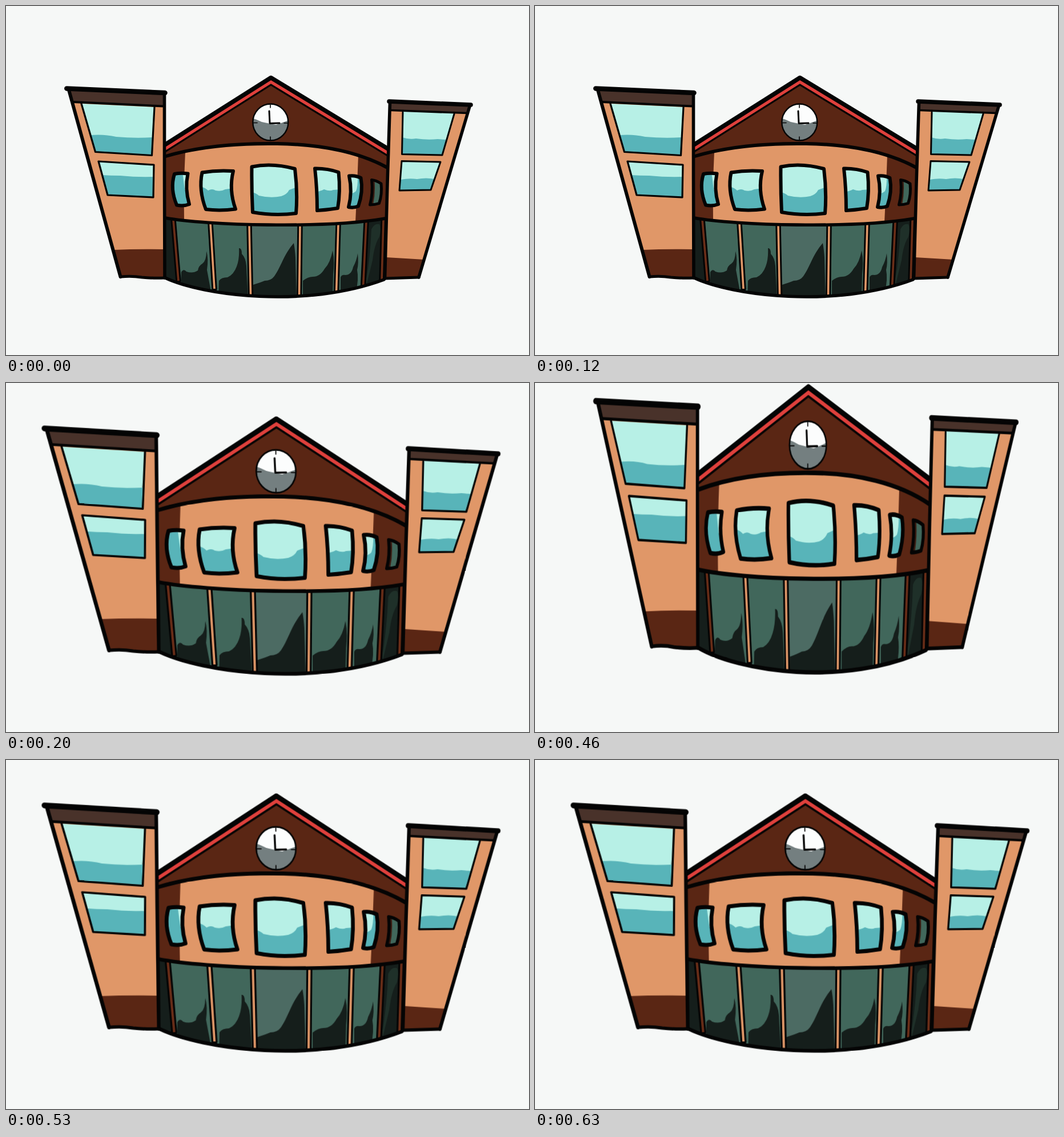
Write an HTML page that moves like this. It is 916 px wide and 611 px high and loops after 0.7 s.

```html
<!DOCTYPE html>
<html lang="en">
<head>
<meta charset="utf-8">
<title>Bouncing building</title>
<style>
  html, body { margin: 0; width: 100%; height: 100%; overflow: hidden; background: #f6f8f7; }
  .stage { position: relative; width: 100%; height: 100%; overflow: hidden; contain: strict; }
  svg {
    position: absolute; left: 0; top: 0; width: 916px; height: 611px;
    transform-origin: 0 0;
    animation: bounce 700ms step-end infinite;
  }
  /* rest, swell with a slight perspective tilt, tall stretch, swell */
  @keyframes bounce {
    0%, 100% { transform: none; }
    28.5714%, 75.7143% {
      transform: translate(67px, 79px)
        matrix3d(1.14872, .01622, 0, .00003217, .02013, 1.19243, 0, .00003777, 0, 0, 1, 0, 0, 0, 0, 1)
        translate(-106px, -144px);
    }
    51.4286% { transform: matrix(1.0409, 0, 0, 1.303, -4.3, -156.6); }
  }
  .ink { fill: none; stroke: #040404; stroke-linecap: round; stroke-linejoin: round; }
  .tan { fill: #e09768; }
  .brown { fill: #5a2614; }
  .cap { fill: #49322a; }
  .sky { fill: #b7f0e6; }
  .sea { fill: #58b4b9; }
  .green { fill: #41675b; }
  .dark { fill: #151e1b; }
  .bar { fill: none; stroke: #e09768; stroke-width: 3.6; }
  .bar.shade { stroke: #6b2e18; }
</style>
</head>
<body>
<div class="stage">
<svg viewBox="0 0 916 611">
  <defs>
    <path id="w1" d="M295 294Q306 292 318.500 293.500Q313 320 321 347Q311 351 299 348.500Q287 320 295 294Z"/>
    <path id="w2" d="M343.500 291.500Q370 287 398 289Q390 322 402 355.500Q375 359 350 356Q337 322 343.500 291.500Z"/>
    <path id="w3" d="M430.500 281.500Q466 274 506 285Q511 325 508 363Q470 368 432 361Q430 320 430.500 281.500Z"/>
    <path id="w4" d="M541 284.500Q562 284 582.500 291Q586 325 581 354Q563 357 545 358Q545 320 541 284.500Z"/>
    <path id="w5" d="M601 297.500Q612 296 621.500 301Q626 325 617 350.500Q609 354 600 352Q607 325 601 297.500Z"/>
    <path id="w6" d="M640.500 304.500Q648 305 657 311Q659 330 653.500 345.500Q646 348 637.500 348Q643 328 640.500 304.500Z"/>
    <path id="bars" d="M358 381L365 495M426 384L428.500 505M515 385L513.500 508M582 382L578.500 503"/>
    <path id="ends" d="M293 374L302 481M631 378L625.500 492M661 375L658 482"/>
    <clipPath id="c1"><use href="#w1"/></clipPath>
    <clipPath id="c2"><use href="#w2"/></clipPath>
    <clipPath id="c3"><use href="#w3"/></clipPath>
    <clipPath id="c4"><use href="#w4"/></clipPath>
    <clipPath id="c5"><use href="#w5"/></clipPath>
    <clipPath id="c6"><use href="#w6"/></clipPath>
    <clipPath id="face"><ellipse cx="463.300" cy="203.500" rx="31" ry="32"/></clipPath>
    <clipPath id="front"><path d="M279 371C350 384 560 390 664 372L662 479C525 530 345 507 279 476Z"/></clipPath>
  </defs>

  <!-- gable -->
  <path class="brown" d="M280 246L464 126L669 252V290H280Z"/>
  <path d="M279 249.500L464 132.500L669 257" fill="none" stroke="#df403c" stroke-width="6"/>
  <path class="ink" d="M279 242.500L464 125.500L669 250" stroke-width="7.500"/>
  <path class="ink" d="M279 255L464 138L669 262.500" stroke-width="3"/>

  <!-- upper wall -->
  <path class="tan" d="M280 263C340 245 410 240 475 241C545 242 615 254 668 283L664 372C560 390 350 384 279 371Z"/>
  <path class="brown" d="M280 263L314 255Q311 315 312 375L279 371Z"/>
  <path class="brown" d="M617 261Q643 269 668 283L664 372L612 379Q615 320 617 261Z"/>
  <path class="ink" d="M280 263C340 245 410 240 475 241C545 242 615 254 668 283" stroke-width="6"/>

  <!-- shop front -->
  <g clip-path="url(#front)">
    <path class="green" d="M278 360H668V520H278Z"/>
    <path d="M426 370H515V520H428Z" fill="#4c6b63"/>
    <g class="dark">
      <path d="M275 360H292L302 500H275Z"/>
      <path d="M307 466Q311 459 316 465Q327 469 336 463Q337 455 344 451Q351 446 351 429Q355 442 352 462L359 500H306Z"/>
      <path d="M373 481Q377 475 388 475Q399 470 404 456Q409 443 408 424Q413 423 413 434Q420 441 421 455L424 515H372Z"/>
      <path d="M433 488Q446 484 453 481Q464 481 470 473C482 456 486 436 504 415Q506 425 507 440L509 520H433Z"/>
      <path d="M520 481Q529 474 537 474Q550 474 558 460Q568 450 572 428Q576 446 573 470L572 515H520Z"/>
      <path d="M586 475Q588 470 594 471Q605 471 608 457Q614 446 616 433Q618 450 615 462Q618 478 613 500H586Z"/>
      <path d="M633 370H664V495H626Z"/>
    </g>
    <path d="M640 391Q645 380 654 382Q658 390 654 404Q645 418 642 445L632 486L630 484Q638 440 640 391Z" fill="#1f3029"/>
    <g class="ink">
      <use href="#bars" stroke-width="9.500"/>
      <use href="#ends" stroke-width="9.500"/>
    </g>
    <use class="bar" href="#bars"/>
    <use class="bar shade" href="#ends"/>
  </g>
  <path class="ink" d="M279 371C350 384 560 390 664 372" stroke-width="5.600"/>
  <path class="ink" d="M279 476C345 507 525 530 662 479" stroke-width="5.600"/>

  <!-- row of windows -->
  <g clip-path="url(#c1)"><path class="sea" d="M285 285H330V355H285Z"/><path class="sky" d="M309 290H322V326L313 322Z"/></g>
  <g clip-path="url(#c2)"><path class="sky" d="M335 280H410V362H335Z"/><path class="sea" d="M335 316Q347 316 354 323Q361 319 367 323Q377 325 384 321L405 318V362H335Z"/></g>
  <g clip-path="url(#c3)"><path class="sky" d="M425 272H515V370H425Z"/><path class="sea" d="M425 325Q437 326 443 332Q464 337 482 333Q492 330 496 322L515 315V370H425Z"/></g>
  <g clip-path="url(#c4)"><path class="sky" d="M535 280H590V362H535Z"/><path class="sea" d="M535 327Q550 325 557 321Q567 325 573 322L590 321V362H535Z"/></g>
  <g clip-path="url(#c5)"><path class="sky" d="M595 290H630V358H595Z"/><path class="sea" d="M616 290H630V358H595V328Q607 330 613 324Q617 315 616 290Z"/></g>
  <g clip-path="url(#c6)"><path class="green" d="M635 300H662V352H635Z"/><path d="M635 300H645Q648 328 642 352H635Z" fill="#3a1a10"/></g>
  <g class="ink" stroke-width="6">
    <use href="#w1"/><use href="#w2"/><use href="#w3"/><use href="#w4"/><use href="#w5"/><use href="#w6" stroke-width="5"/>
  </g>

  <!-- clock -->
  <g clip-path="url(#face)">
    <path d="M430 170H496V238H430Z" fill="#fcfdfd"/>
    <path d="M430 196Q440 199 448 203Q462 206 473 208Q482 205 496 200V238H430Z" fill="#747f80"/>
  </g>
  <ellipse class="ink" cx="463.300" cy="203.500" rx="31" ry="32" stroke-width="2.400"/>
  <path class="ink" d="M463 173V178M463 229V235M433 204.500H440M487 205H493" stroke-width="1.600"/>
  <path class="ink" d="M461 184L462 205.500L479 205" stroke-width="3"/>

  <!-- left tower -->
  <path class="tan" d="M111 148L278 154V476L240 474H201Z"/>
  <path class="brown" d="M188 427Q230 425 278 426V476L240 474H201Z"/>
  <path class="cap" d="M111 148L278 154V176L119 168Z"/>
  <path class="sky" d="M132 171L260 177L255 261L157 255Z"/>
  <path class="sea" d="M148 226Q172 224 193 229Q225 232 257.500 230L255 261L157 255Z"/>
  <path class="sky" d="M162 272L259 278L258 335L178 331Z"/>
  <path class="sea" d="M168 296Q184 297 200 297Q230 300 259 299L258 335L178 331Z"/>
  <g class="ink">
    <path d="M118 168L277 175.500" stroke-width="4"/>
    <path d="M132 171L156.500 255.500L255.500 261.500L260 177M162 272L259 278L258 335L178 331Z" stroke-width="3.200"/>
    <path d="M110.300 148L200.500 474" stroke-width="6"/>
    <path d="M277.500 154L277.500 300L278 476" stroke-width="5.600"/>
    <path d="M201 474Q220 472 238 475Q258 477 278 476" stroke-width="5"/>
    <path d="M106.300 144.500L278.500 152" stroke-width="8.500"/>
  </g>

  <!-- right tower -->
  <path class="tan" d="M673 168L812 175L723 475L664 477Z"/>
  <path class="brown" d="M666 440Q700 442 733 444L723 475L664 477Z"/>
  <path class="cap" d="M673 168L812 175L808 188L672 182Z"/>
  <path class="sky" d="M695 184L785 188L764 261L694 259Z"/>
  <path class="sea" d="M694 230Q706 234 718 232Q738 235 756 233L772 234L764 261L694 259Z"/>
  <path class="sky" d="M693 271L761 273L744 322L689 323Z"/>
  <path class="sea" d="M691 304Q706 301 720 303Q736 300 751 303L744 322L689 323Z"/>
  <g class="ink">
    <path d="M674 182.500L808 187.500" stroke-width="3.600"/>
    <path d="M695 186L693.500 259.500L764 261L785 189M693 271.500L761 273L744 322L689 323Z" stroke-width="3"/>
    <path d="M672.500 168L668 310L663.500 477" stroke-width="5.600"/>
    <path d="M812 176L723 475" stroke-width="5.500"/>
    <path d="M663.500 477L723 475" stroke-width="5"/>
    <path d="M671 167L814 173" stroke-width="7.500"/>
  </g>
</svg>
</div>
</body>
</html>
```
